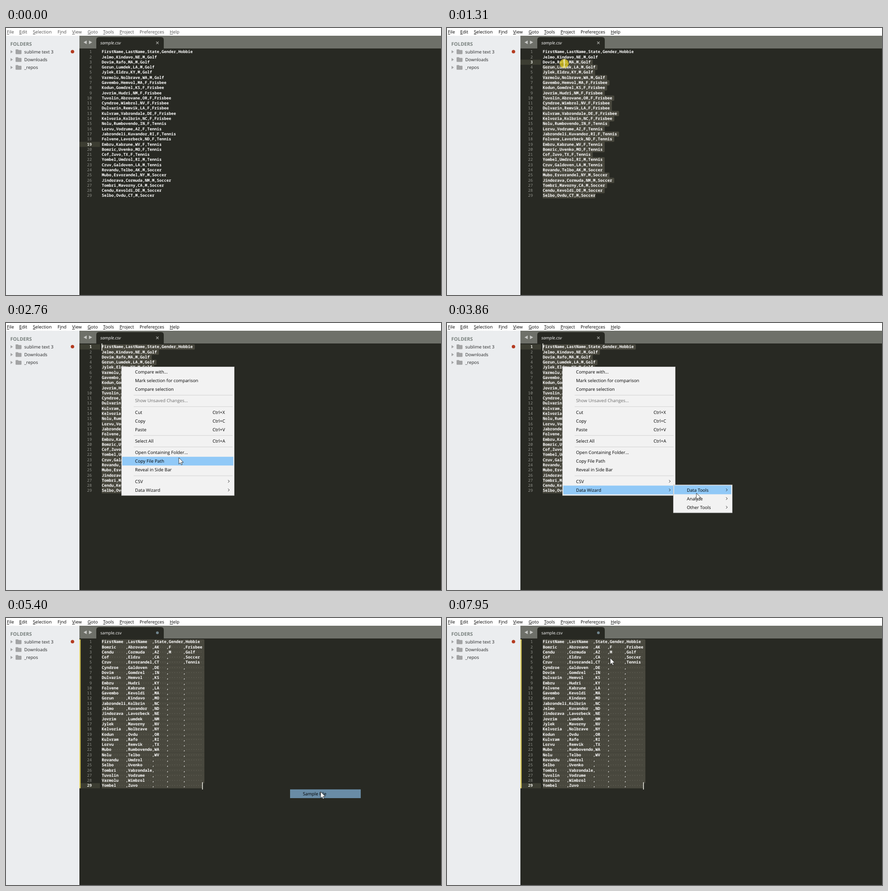
Animation of 954x587 px, one loop 8 s. Source, as an HTML page:

```html
<!DOCTYPE html>
<html lang="en">
<head>
<meta charset="utf-8">
<title>Editor demo</title>
<style>
  html, body { margin: 0; width: 100%; height: 100%; overflow: hidden; background: #282923; }
  svg { display: block; width: 954px; height: 587px; }
  text { font: 9.75px "Open Sans", "Noto Sans", sans-serif; text-rendering: geometricPrecision; }
  .code { font: 600 8.75px "Noto Sans Mono", "DejaVu Sans Mono", monospace; fill: #fff; }
  .num { font-weight: 500; fill: #90918b; text-anchor: end; }
  .num.on { font-weight: 600; fill: #f0f0ea; }
  .dots { font-weight: 500; fill: #7f7e73; }
  .u { text-decoration: underline; }
</style>
</head>
<body>
<svg viewBox="0 0 954 587">
  <g id="shell"></g>
  <g id="bar"></g>
  <g id="editor"></g>
  <g id="over"></g>
</svg>
<script>
const LOOP = 8000, TICK = 77.1, LAG = 27;
const PRESS = 10, RELEASE = 25, APPLY = 70;
const LEFT = 210, TOP = 47, CHAR = 5.25, LINE = 11.29;

const PEOPLE = {
  'M,Golf': 'Jelmo,Kindavo,NE Dovim,Rafo,MA Gorun,Lumdek,LA Jylek,Eldru,KY Varmolu,Nolbrave,WA',
  'F,Frisbee': 'Gavembo,Hemvol,MA Kodun,Gomdrel,KS Jovrim,Hudri,NM Tuvolin,Abrovane,OR Cyndroe,Wimbrol,NV ' +
    'Dulvarin,Remvik,LA Kulvram,Vabrondale,DE Kelvoria,Kolbrin,NC',
  'F,Tennis': 'Nolu,Rumbovendo,IN Lorvu,Vodrume,AZ Jabrondeli,Kuvandor,RI Folvene,Lavorbeck,ND ' +
    'Embru,Kabrune,WV Bomric,Uvenko,MO Cof,Zuvo,TX',
  'M,Tennis': 'Yombel,Umdrol,RI Cruv,Galdoven,LA',
  'M,Soccer': 'Rovandu,Telbo,AK Mubo,Esvorandel,NY Jindorava,Cormuda,NM Tombri,Mavorny,CA ' +
    'Cendu,Kevoldi,DE Selbo,Ovdu,CT'
};
const HEAD = 'FirstName,LastName,State,Gender,Hobbie';
const csv = [HEAD];
for (const [tail, list] of Object.entries(PEOPLE))
  for (const p of list.split(' ')) csv.push(p + ',' + tail);

// Each column reduced to its sorted distinct values, padded to equal width
const columns = HEAD.split(',').map((name, c) => {
  const values = [...new Set(csv.slice(1).map(line => line.split(',')[c]))].sort();
  const cells = [name, ...values];
  const width = Math.max(...cells.map(v => v.length));
  return csv.map((_, i) => (cells[i] || '').padEnd(width));
});
const sample = csv.map((_, i) => columns.map(col => col[i]).join(','));

// Pointer path: tick, x, y
const PATH = [
  [1, 660, 502], [2, 560, 462], [3, 430, 400], [4, 351, 366], [5, 351, 366], [8, 370, 376],
  [11, 370, 376], [12, 362, 350], [14, 320, 230], [16, 270, 110], [17, 257, 78], [20, 232, 63],
  [23, 198, 51], [24, 198, 51], [28, 252, 96], [33, 252, 96], [36, 379, 296], [38, 410, 335],
  [40, 422, 349], [41, 426, 359], [43, 436, 366], [46, 468, 367], [48, 512, 368], [50, 547, 374],
  [51, 555, 381], [55, 595, 385], [59, 640, 384], [62, 665, 383], [66, 690, 382], [80, 690, 382],
  [83, 655, 340], [88, 460, 110], [91, 420, 68], [92, 420, 68], [94, 413, 90], [96, 395, 104],
  [98, 376, 88], [100, 362, 67], [101, 362, 67], [103, 358, 88]
];

const $ = id => document.getElementById(id);
const rect = (x, y, w, h, fill, more = '') =>
  `<rect x="${x}" y="${y}" width="${w}" height="${h}" fill="${fill}" ${more}/>`;
const path = (d, fill, more = '') => `<path d="${d}" fill="${fill}" ${more}/>`;
const dot = (x, y, r, fill, more = '') => `<circle cx="${x}" cy="${y}" r="${r}" fill="${fill}" ${more}/>`;
const text = (x, y, s, more = '') => `<text x="${x}" y="${y}" ${more}>${s}</text>`;
const clamp = (v, lo, hi) => Math.min(hi, Math.max(lo, v));

function pointer(k) {
  const i = PATH.findIndex(p => p[0] >= k);
  if (i < 0) return PATH.at(-1).slice(1);
  if (i === 0) return PATH[0].slice(1);
  const [a, ax, ay] = PATH[i - 1], [b, bx, by] = PATH[i];
  const f = (k - a) / (b - a);
  return [ax + (bx - ax) * f, ay + (by - ay) * f];
}

function drawShell() {
  const folders = ['sublime text 3', 'Downloads', '_repos'].map((name, i) => {
    const y = 52.3 + i * 17.2;
    return path(`M10 ${y - 3.5}l5 3.5 -5 3.5z`, '#a2a4a5') +
      path(`M21 ${y - 4}q0-1.3 1.3-1.3h4l1.3 1.6h5q1.4 0 1.4 1.4v6q0 1.4-1.4 1.4h-10.3q-1.3 0-1.3-1.4z`, '#a3a4a5') +
      text(40, y + 3.7, name, 'fill="#252627"');
  }).join('');
  $('shell').innerHTML =
    rect(0, 0, 954, 587, '#282923') + rect(0, 0, 954, 17, '#fff') +
    rect(0, 17, 161, 570, '#ebedef') + rect(161, 17, 793, 28, '#6e7069') +
    path('M198 45V26q0-6 6-6h136q6 0 6 6v19z', '#282923') +
    path('M177 27.5v8l-7-4zM182 27.5v8l7-4z', '#c6c7c4') +
    text(9.5, 38.5, 'FOLDERS', 'fill="#7a827f" style="font-size:10.7px;font-weight:700"') +
    folders + dot(145.8, 52, 3.8, '#b43a1f');
}

// The underscore marks the access key
const MENUS = { _File: 2, _Edit: 29, _Selection: 59, 'F_ind': 113, _View: 145, _Goto: 179,
  _Tools: 213, _Project: 249, 'Prefere_nces': 293, _Help: 359 };

function drawBar(k) {
  const color = k < PRESS ? '#4c4c4c' : '#000';
  const done = k >= APPLY;
  const items = Object.entries(MENUS).map(([name, x]) =>
    text(x, 12.2, name.replace(/_(.)/, '<tspan class="u">$1</tspan>'), `fill="${color}"`));
  $('bar').innerHTML = items.join('') +
    text(207, 35.8, 'sample.csv', `fill="#fff" style="font-size:${done ? 9.1 : 9.4}px;font-style:${done ? 'normal' : 'italic'}"`) +
    (done ? dot(332, 32.5, 3, '#71858e')
      : path('M329.3 30l5.4 5.4m0-5.4l-5.4 5.4', 'none', 'stroke="#a9aaa6" stroke-width="1.2"'));
}

function caretAt(k, lines) {
  if (k < PRESS) return [18, 0];
  if (k >= APPLY) return [28, lines[28].length];
  const [x, y] = pointer(Math.min(k, RELEASE - 1));
  const row = clamp(Math.floor((y - TOP) / LINE), 0, 28);
  return [row, clamp(Math.round((x - LEFT) / CHAR), 0, lines[row].length)];
}

function selection(from, col, lines) {
  let out = '';
  for (let i = from; i < lines.length; i++) {
    const x0 = LEFT + (i === from ? col * CHAR : 0);
    const x1 = LEFT + lines[i].length * CHAR + (i < lines.length - 1 ? 4.6 : 0);
    if (x1 - x0 < 1) continue;
    const y = TOP + i * LINE;
    // Round only the corners that stick out past the neighbouring lines
    const juts = j => !lines[j] || j < from || lines[j].length < lines[i].length;
    const up = juts(i - 1) ? 2 : 0, down = juts(i + 1) ? 2 : 0;
    out += path(`M${x0} ${y}H${x1 - up}q${up} 0 ${up} ${up}V${y + LINE + .1 - down}q0 ${down} ${-down} ${down}H${x0}z`, '#49483e');
  }
  return out;
}

function drawEditor(k) {
  const done = k >= APPLY;
  const lines = done ? sample : csv;
  const [row, col] = caretAt(k, lines);
  let out = rect(161, TOP + row * LINE, 45, LINE, '#3c3d32');
  if (done) out += rect(161, TOP, 2.6, LINE * 29, '#ddcd60') + selection(0, 0, lines);
  else if (k >= PRESS) out += selection(row, col, lines);
  lines.forEach((line, i) => {
    const y = 55.3 + i * LINE;
    out += text(188.3, y, i + 1, `class="code num${i === row ? ' on' : ''}"`) +
      text(LEFT, y, line.replace(/ /g, '\u00a0'), 'class="code"');
    if (done) out += text(LEFT, y, line.replace(/[^ ]/g, '\u00a0').replace(/ /g, '·'), 'class="code dots"');
  });
  if (k >= PRESS) out += rect(LEFT + col * CHAR - 0.4, TOP + row * LINE - 2, 1.5, 16, '#f8f8f0');
  $('editor').innerHTML = out;
}

// Item suffixes: ">" opens a submenu, "!" is disabled, "|" precedes a shortcut
function makeMenu(open, x, y, w, items) {
  let cy = y + 11.4;
  const rows = [], lines = [];
  for (const item of items) {
    if (item === '-') { lines.push(cy - 6.5); cy += 6.1; continue; }
    const [, label, mark, key] = item.match(/^([^>!|]+)([>!|]?)(.*)$/);
    rows.push({ label, mark, key, cy });
    cy += 19.1;
  }
  return { open, x, y, w, h: cy - 6.6 - y, rows, lines };
}
const popups = [
  makeMenu(32, 253, 96, 248, ['Compare with...', 'Mark selection for comparison', 'Compare selection', '-',
    'Show Unsaved Changes...!', '-', 'Cut|Ctrl+X', 'Copy|Ctrl+C', 'Paste|Ctrl+V', '-', 'Select All|Ctrl+A', '-',
    'Open Containing Folder...', 'Copy File Path', 'Reveal in Side Bar', '-', 'CSV>', 'Data Wizard>']),
  makeMenu(46, 496, 355.5, 130, ['Data Tools>', 'Analyze>', 'Other Tools>']),
  makeMenu(57, 621, 374.6, 159, ['Sample File', 'Analyze File', 'Frequency Report'])
];
const PARENTS = ['Data Wizard', 'Analyze'];

function drawMenu(m, active, k) {
  let out = rect(m.x + .5, m.y + .5, m.w - 1, m.h - 1, '#f2f2f2', 'stroke="#c4c4c4"');
  for (const y of m.lines) out += rect(m.x + 27, y, m.w - 31, 1, '#d2d2d2');
  for (const r of m.rows) {
    if (r.label === active) out += rect(m.x + 2, r.cy - 9.6, m.w - 4.5, 19.2, '#91c9f7');
    out += text(m.x + 30, r.cy + 3.6, r.label, `fill="${r.mark === '!' ? '#6d6d6d' : '#000'}"`);
    if (r.key) out += text(m.x + 200, r.cy + 3.6, r.key);
    if (r.mark === '>')
      out += path(`M${m.x + m.w - 14} ${r.cy - 2.8}l2.8 2.8 -2.8 2.8`, 'none', 'stroke="#222"');
  }
  return `<g opacity="${Math.min(1, (k - m.open + 1) * .4)}">${out}</g>`;
}

function drawMenus(k, x, y) {
  const shown = popups.filter(m => k >= m.open);
  const inside = m => x >= m.x && x < m.x + m.w && y >= m.y && y < m.y + m.h;
  const top = shown.findLastIndex(inside);
  return shown.map((m, i) => {
    const hit = i === top && m.rows.find(r => Math.abs(y - r.cy) <= 9.55);
    return drawMenu(m, i < top ? PARENTS[i] : hit && hit.label, k);
  }).join('');
}

function drawOver(k) {
  const [x, y] = pointer(k);
  let out = '';
  if (k >= 32 && k < APPLY) out += drawMenus(k, x, y);
  if (k >= APPLY && k < 73)
    out += `<g opacity="${.62 * (73 - k) / 3}">${rect(623, 376.8, 155, 19.2, '#91c9f7')}</g>` +
      text(651, 389.6, 'Sample File', `opacity="${(73 - k) / 3}"`);
  const clicking = (k >= PRESS && k < RELEASE) || k === 30 || k === 67;
  if (clicking) out += dot(x, y, 10, '#e0cb1d', 'opacity=".75"');
  if (k >= 1) out += `<g transform="translate(${x} ${y})">` + (k < RELEASE
    ? path('M-3-8h2q1 0 1 1v14q0 1-1 1h-2M3-8H1q-1 0-1 1v14q0 1 1 1h2', 'none', 'stroke="#f4f4ee"')
    : path('M0 0V14.2L3.3 11.2 5.4 15.9 7.6 15 5.5 10.3H10z', '#fff', 'stroke="#111" stroke-width=".8"')) + '</g>';
  $('over').innerHTML = out;
}

drawShell();
const start = performance.now();
let last = -1;
function frame() {
  const t = (performance.now() - start) % LOOP;
  const k = Math.floor((t + LAG) / TICK);
  if (k !== last) {
    last = k;
    drawBar(k);
    drawEditor(k);
    drawOver(k);
  }
  requestAnimationFrame(frame);
}
frame();
</script>
</body>
</html>
```
